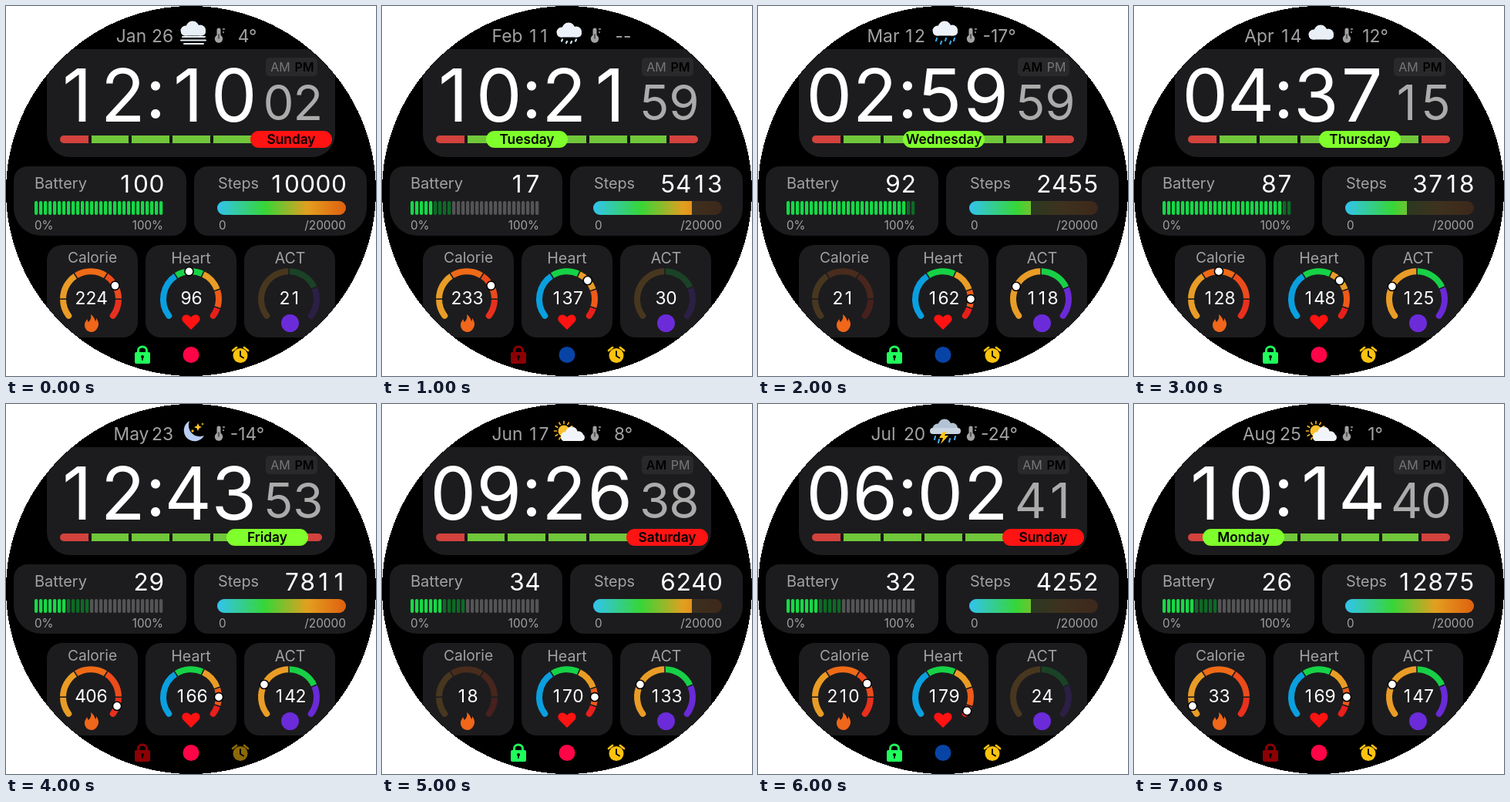
Recreate the animation shown at these times as an HTML page. Size 480 by 480 pixels, loop 8000 ms.

```html
<!DOCTYPE html>
<html lang="en">
<head>
<meta charset="utf-8">
<title>Watch face</title>
<style>
  html, body { margin: 0; width: 100%; height: 100%; overflow: hidden; background: #fff; }
  svg { display: block; width: 100vw; height: 100vh; }
  text { font-family: Inter, Roboto, sans-serif; }
</style>
</head>
<body>
<svg id="face" viewBox="0 0 480 480"></svg>
<script>
const CARD = '#1c1c1e', GREY = '#a2a2a3';
const STEP = 1000;

// Battery: lit and half-lit bars. Steps: filled pixels. Gauges: knob angle, null when dim.
const KEYS = ['month', 'day', 'sky', 'temp', 'time', 'sec', 'half', 'week', 'bat', 'lit', 'halfLit',
  'steps', 'fill', 'cal', 'calAt', 'heart', 'heartAt', 'act', 'actAt', 'lock', 'link', 'alarm'];
const STATES = [
  ['Jan', '26', 'fog', '4°', '1210', '02', 'PM', 'Sunday', 100, 28, 0, 10000, 167, 224, 61, 96, -4, 21, null, 1, 1, 1],
  ['Feb', '11', 'snow', '--', '1021', '59', 'PM', 'Tuesday', 17, 5, 4, 5413, 128, 233, 61, 137, 48, 30, null, 0, 0, 1],
  ['Mar', '12', 'rain', '-17°', '0259', '59', 'AM', 'Wednesday', 92, 26, 2, 2455, 80, 21, null, 162, 90, 118, -63, 1, 0, 1],
  ['Apr', '14', 'cloud', '12°', '0437', '15', 'PM', 'Thursday', 87, 26, 2, 3718, 80, 128, 0, 148, 48, 125, -63, 1, 1, 1],
  ['May', '23', 'moon', '-14°', '1243', '53', 'PM', 'Friday', 29, 7, 5, 7811, 167, 406, 109, 166, 90, 142, -63, 0, 1, 0],
  ['Jun', '17', 'sun', '8°', '0926', '38', 'AM', 'Saturday', 34, 7, 5, 6240, 128, 18, null, 170, 90, 133, -63, 1, 1, 1],
  ['Jul', '20', 'storm', '-24°', '0602', '41', 'PM', 'Sunday', 32, 7, 5, 4252, 80, 210, 61, 179, 120, 24, null, 1, 0, 1],
  ['Aug', '25', 'sun', '1°', '1014', '40', 'PM', 'Monday', 26, 7, 5, 12875, 167, 33, -109, 169, 90, 147, -63, 0, 1, 1]
].map(row => Object.fromEntries(KEYS.map((k, i) => [k, row[i]])));

const PILL_X = { Monday: 142, Tuesday: 188, Wednesday: 241, Thursday: 293, Friday: 339, Saturday: 370, Sunday: 370 };

const text = (s, x, y, size, fill = GREY, anchor = 'middle', weight = 400) =>
  `<text x="${x}" y="${y}" font-size="${size}" fill="${fill}" text-anchor="${anchor}" font-weight="${weight}">${s}</text>`;
const rect = (x, y, w, h, r, fill, extra = '') =>
  `<rect x="${x}" y="${y}" width="${w}" height="${h}" rx="${r}" fill="${fill}" ${extra}/>`;
const dot = (x, y, r, fill, extra = '') => `<circle cx="${x}" cy="${y}" r="${r}" fill="${fill}" ${extra}/>`;
const shape = (d, fill) => `<path d="${d}" fill="${fill}"/>`;
const line = (d, stroke, w, cap = 'round') =>
  `<path d="${d}" fill="none" stroke="${stroke}" stroke-width="${w}" stroke-linecap="${cap}"/>`;
const range = (n, f) => Array.from({ length: n }, (_, i) => f(i)).join('');

// Digits centred in equal cells that end at the given right edge.
const digits = (v, right, y, size, pitch, fill = '#fff') => {
  const s = String(v);
  return range(s.length, i => text(s[i], right - pitch * (s.length - i - 0.5), y, size, fill));
};

function polar(cx, deg, r = 36) {
  const a = deg * Math.PI / 180;
  return `${(cx + r * Math.sin(a)).toFixed(2)} ${(380.2 - r * Math.cos(a)).toFixed(2)}`;
}

// Stops are clock angles; colors fill the spans between them. Round ends go first.
function gauge(cx, stops, colors, knob) {
  const last = colors.length - 1;
  const arc = (i, cap) => line(`M${polar(cx, stops[i])}A36 36 0 0 1 ${polar(cx, stops[i + 1])}`, colors[i], 8, cap);
  const ends = arc(0, 'round') + arc(last, 'round');
  const mids = range(last - 1, i => arc(i + 1, 'butt'));
  const ticks = stops.slice(1, -1).map(a =>
    line(`M${polar(cx, a, 31)}L${polar(cx, a, 41)}`, CARD, 1.6, 'butt')).join('');
  const ring = `<g opacity="${knob === null ? 0.21 : 1}">${ends}${mids}${ticks}</g>`;
  if (knob === null) return ring;
  const [x, y] = polar(cx, knob).split(' ');
  return ring + dot(x, y, 5.6, '#fff', 'stroke="#000" stroke-width="1.6"');
}

const cloud = (fill, dy = 0) => `<g transform="translate(0 ${dy})">` +
  dot(233, 33, 6.5, fill) + dot(242, 29, 8.5, fill) + dot(252, 32.5, 7, fill) + rect(227, 30, 32, 9.5, 4.7, fill) + '</g>';
const drops = (pts, fill, len = 4) => pts.map(([x, y]) => line(`M${x} ${y}l-1 ${len}`, fill, 2.2)).join('');
const star = (x, y, r) => {
  const q = r * 0.3;
  return shape(`M${x} ${y - r}l${q} ${r - q} ${r - q} ${q} ${q - r} ${q} ${-q} ${r - q} ${-q} ${q - r} ${q - r} ${-q} ${r - q} ${-q}z`, '#ffc928');
};

const SKY = {
  fog: () => cloud('#e9eff7', -1) +
    [[229, 258, 40], [227, 259, 44.5], [231, 256, 49]].map(([a, b, y]) => line(`M${a} ${y}H${b}`, '#e9eff7', 2)).join(''),
  snow: () => cloud('#edf2fa', 1) +
    drops([[234, 43.5], [240, 46], [246, 46], [252, 43.5]], '#d3e9fa', 2),
  rain: () => cloud('#edf2fa', -1) +
    drops([[232, 42], [238, 46], [244, 42], [250, 46], [255, 42]], '#3fa9e8', 3),
  cloud: () => cloud('#e9eff7', 4),
  moon: () => shape('M238 22A14 14 0 1 0 257 41A14.5 14.5 0 0 1 238 22Z', '#b8cdf2') +
    star(249, 30, 5) + star(242, 35, 2.6) + star(255, 26, 2),
  storm: () => cloud('#b3c3d5', -1) + rect(223, 31, 40, 8, 4, '#c9d5e3') +
    drops([[230, 42], [235, 46], [249, 45], [256, 42]], '#4aa5e0') +
    shape('M240 36L235 44H240L237 52L247 41H242L245 36Z', '#ffc61a'),
  sun: () => range(12, i => {
    const a = i * Math.PI / 6, c = Math.cos(a), s = Math.sin(a);
    return line(`M${236 + 9.5 * c} ${35 + 9.5 * s}L${236 + 12.5 * c} ${35 + 12.5 * s}`, '#ffb81c', 1.6);
  }) + dot(236, 35, 7.5, '#ffc12b') +
    dot(238, 42, 6, '#f1f4f9') + dot(246, 37.5, 8, '#f1f4f9') + dot(255, 41.5, 6.2, '#f1f4f9') + rect(232, 39, 31, 9, 4.5, '#f1f4f9')
};

const thermometer = () => line('M276 31V41', GREY, 5) + dot(276, 42.5, 5.2, GREY) +
  line('M276 37V42', '#3a3a3a', 1.4) + line('M281 30H284M281 34H283', GREY, 1.6, 'butt');

function header(s) {
  return text(s.month, 162.5, 47, 22.8) + digits(s.day, 217, 47, 22.8, 14, GREY) +
    SKY[s.sky]() + thermometer() + text(s.temp, 313, 47, 22.8);
}

function clock(s) {
  const half = (name, x) => text(name, x, 85, 16, s.half === name ? '#000' : '#777', 'middle', s.half === name ? 600 : 400);
  return rect(53, 56, 374, 140, 30, CARD) + rect(53, 56, 374, 50, 0, CARD) +
    digits(s.time.slice(0, 2), 181.5, 150, 95, 59.5) + text(':', 194, 145, 92, '#fff') +
    digits(s.time.slice(2), 325.5, 150, 95, 59.5) +
    rect(337, 67, 67, 24, 5, '#29292b') + half('AM', 356) + half('PM', 387) +
    digits(s.sec, 411, 147.5, 63.5, 38.3, '#ababab');
}

function week(s) {
  const off = s.week[0] === 'S';
  return rect(70, 168, 340, 10, 5, '#d3423d') + rect(109, 168, 262, 10, 0, '#70c73a') +
    [109, 161, 214, 267, 320, 371].map(x => rect(x - 2, 168, 4, 10, 1, '#151516')).join('') +
    rect(PILL_X[s.week] - 53, 162, 106, 22, 11, off ? '#ff1313' : '#7fff2b') +
    text(s.week, PILL_X[s.week], 179, 17.3, '#000', 'middle', 600);
}

function meters(s) {
  const bar = i => i < s.lit ? '#17d846' : i < s.lit + s.halfLit ? '#0d6a26' : '#545456';
  // The outer bottom corner follows the bezel.
  const panel = 'M28 208H216A18 18 0 0 1 234 226V280A18 18 0 0 1 216 298H46A36 36 0 0 1 10 262V226A18 18 0 0 1 28 208Z';
  return shape(panel, CARD) + `<g transform="translate(478 0) scale(-1 1)">${shape(panel, CARD)}</g>` +
    text('Battery', 37, 237, 20, GREY, 'start') + digits(s.bat, 205.5, 242, 31.5, 20.3) +
    range(28, i => rect(37 + 6 * i, 253, 4.3, 18, 2, bar(i))) +
    text('0%', 37, 290, 15.2, GREY, 'start') + text('100%', 204, 290, 15.2, GREY, 'end') +
    text('Steps', 275, 237, 19.8, GREY, 'start') + digits(s.steps, 442, 242, 31.5, 20.3) +
    rect(274, 253, 167, 18, 9, 'url(#walk)', 'opacity=".17"') +
    `<g clip-path="url(#bar)">${rect(274, 253, s.fill, 18, 0, 'url(#walk)')}</g>` +
    text('0', 276, 290, 15.2, GREY, 'start') + text('/20000', 441, 290, 15.4, GREY, 'end');
}

const flame = () => shape('M110 400C114 403 115 406 116 409C117 408 117 407 117 405C120 409 121 413 119 417C117 421 114 423 111 423C106 423 102 419 102 414C102 410 104 409 105 406C106 408 106 409 107 410C110 407 111 404 110 400Z', '#f0661a');
const heart = () => shape('M240 420L230 410C226 405 230 400 234.500 400.500C237 401 239 402 240 404C241 402 243 401 245.500 400.500C250 400 254 405 250 410Z', '#ff1212');

function gauges(s) {
  const value = (v, x) => digits(v, x + String(v).length * 7, 387, 22.8, 14);
  return [53, 181, 309].map(x => rect(x, 310, 118, 120, 20, CARD)).join('') +
    text('Calorie', 112, 333, 19.2) + text('Heart', 240, 334, 19.7) + text('ACT', 368.5, 334, 19.5) +
    gauge(110, [-127, -90, -33, 33, 90, 127], ['#e99c26', '#e99c26', '#ee6a16', '#ec4b1b', '#e9301e'], s.calAt) +
    gauge(240, [-127, -33, 25, 71, 108, 127], ['#0a9fdf', '#16d246', '#e99c26', '#ee5a18', '#e8201c'], s.heartAt) +
    gauge(367, [-127, 0, 66, 127], ['#e99c26', '#18d047', '#6a2ad8'], s.actAt) +
    value(s.cal, 110.5) + value(s.heart, 240.5) + value(s.act, 368.5) +
    flame() + heart() + dot(368.5, 411.5, 11.5, '#6b2bd9');
}

function status(s) {
  const lock = s.lock ? '#1fff5c' : '#8d0004', bell = s.alarm ? '#ffc20f' : '#8a6908';
  return line('M171.500 450V446.500A5.500 4.500 0 0 1 182.500 446.500V450', lock, 2.8, 'butt') +
    rect(167, 449, 20, 15, 2, lock) + dot(177, 455, 2, '#000') + rect(176.2, 455, 1.6, 5, 0.8, '#000') +
    dot(240, 452.5, 10.5, s.link ? '#ff0447' : '#0844a6') +
    dot(304, 453.5, 9.5, bell) + line('M294 447L299 443M314 447L309 443', bell, 2.8) +
    line('M304 448V454L308 456.500', '#000', 1.9);
}

const DEFS = `<defs>
  <clipPath id="bar"><rect x="274" y="253" width="167" height="18" rx="9"/></clipPath>
  <linearGradient id="walk" gradientUnits="userSpaceOnUse" x1="274" y1="0" x2="441" y2="0">
    <stop offset="0" stop-color="#31c3ee"/><stop offset=".37" stop-color="#37d637"/>
    <stop offset=".7" stop-color="#e29f20"/><stop offset="1" stop-color="#df600e"/>
  </linearGradient></defs>`;
const BACK = rect(0, 0, 480, 480, 0, '#000');
const BEZEL = `<path d="M0 0H480V480H0ZM240 0A240 240 0 0 0 240 480A240 240 0 0 0 240 0Z"
  fill="#fff" fill-rule="evenodd" shape-rendering="crispEdges"/>`;

const face = document.getElementById('face');
const start = performance.now();
let shown = -1;

function draw(i) {
  const parts = [header, clock, week, meters, gauges, status];
  face.innerHTML = DEFS + BACK + parts.map(part => part(STATES[i])).join('') + BEZEL;
  shown = i;
}

function tick() {
  const i = Math.floor((performance.now() - start) / STEP) % STATES.length;
  if (i !== shown) draw(i);
  requestAnimationFrame(tick);
}
tick();
</script>
</body>
</html>
```
